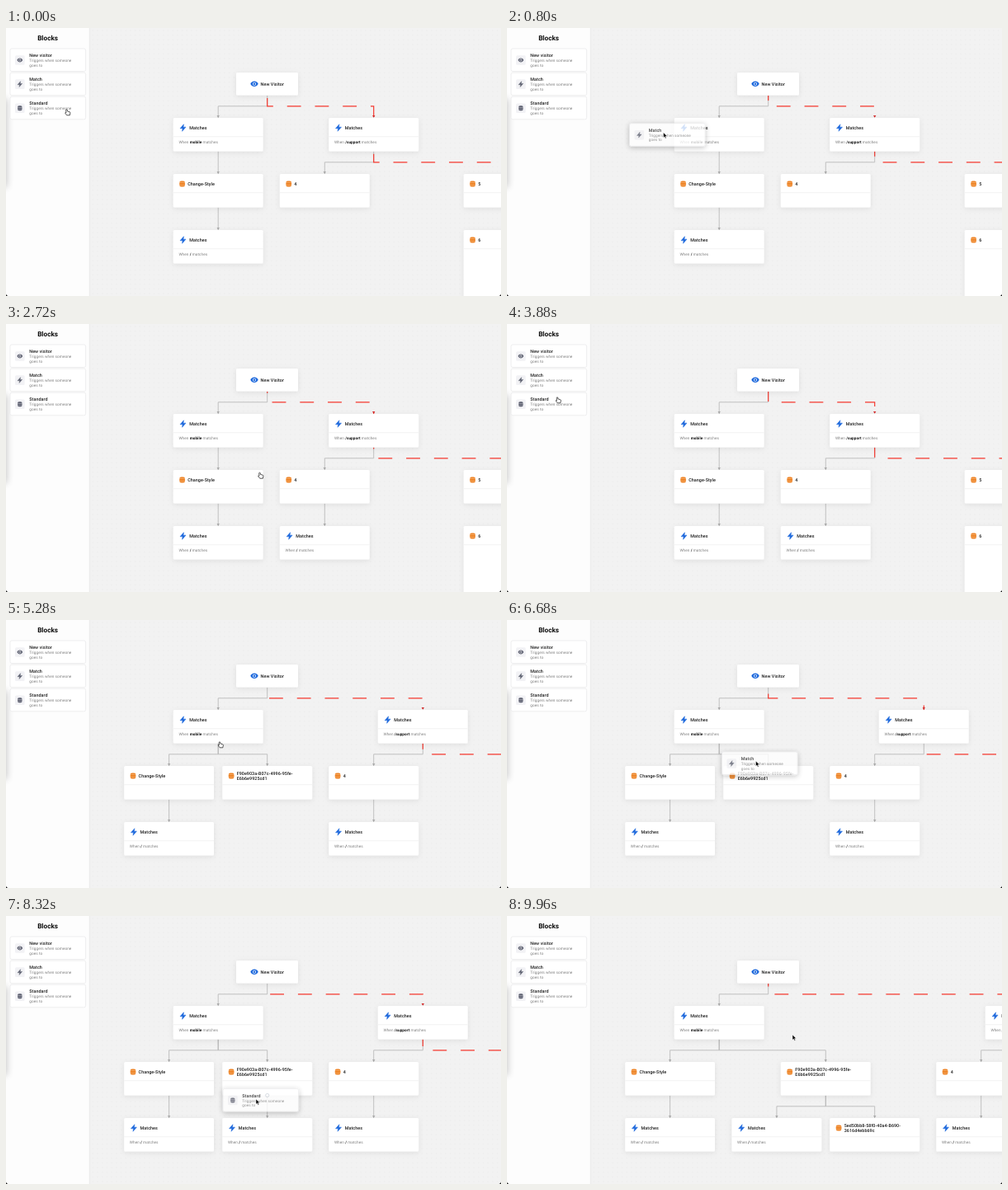
An HTML page that plays this animation: 600 by 325 pixels, repeating every 10 s.

```html
<!DOCTYPE html>
<html lang="en">
<head>
<meta charset="utf-8">
<title>Flow builder</title>
<style>
html, body { margin: 0; width: 100%; height: 100%; overflow: hidden; background: #f2f2f2; }
svg { display: block; width: 600px; height: 325px; font-family: Roboto, Inter, sans-serif; text-rendering: geometricPrecision; }
.title { font-size: 5.4px; font-weight: 500; letter-spacing: .05px; fill: #1c1c1c; }
.note { font-size: 4.7px; letter-spacing: .05px; fill: #7d7d7d; }
.note tspan { font-weight: 700; fill: #151515; }
.wire { fill: none; stroke: #b4b4b4; stroke-width: .8; }
.hot { fill: none; stroke: #f5392f; stroke-width: 1.2; stroke-dasharray: 16.875; }
</style>
</head>
<body>
<svg id="stage" viewBox="0 0 600 325">
  <defs>
    <pattern id="dots" width="5.7" height="5.7" patternUnits="userSpaceOnUse">
      <rect width="5.7" height="5.7" fill="#f2f2f2"/><circle cx="2.8" cy="2.8" r=".5" fill="#e4e4e4"/>
    </pattern>
    <filter id="soft" x="-20%" y="-40%" width="140%" height="190%">
      <feDropShadow dx="0" dy="1.5" stdDeviation="3.2" flood-color="#000" flood-opacity=".08"/>
    </filter>
    <filter id="lift" x="-20%" y="-50%" width="140%" height="210%">
      <feDropShadow dx="0" dy="1.5" stdDeviation="3" flood-color="#000" flood-opacity=".3"/>
    </filter>
    <filter id="blur" x="-200%" y="-20%" width="500%" height="140%"><feGaussianBlur stdDeviation="4.5"/></filter>
    <path id="bolt" d="M1.1-4.9L-4 1H-.5L-1.1 4.9 4-1H.5Z" stroke-width=".6" stroke-linejoin="round"/>
    <g id="eye">
      <path d="M-4.7 0C-2.6-4.4 2.6-4.4 4.7 0C2.6 4.4-2.6 4.4-4.7 0Z"/>
      <circle r="2" fill="#fff"/><circle r="1.3"/>
    </g>
    <g id="stack">
      <path d="M-3.4-1.3Q-3.4-3.6-1.2-3.6H1.2Q3.4-3.6 3.4-1.3Z"/>
      <rect x="-3.4" y="-.9" width="6.8" height="1.8" rx=".5"/>
      <path d="M-3.4 1.3Q-3.4 3.6-1.2 3.6H1.2Q3.4 3.6 3.4 1.3Z"/>
    </g>
  </defs>
  <rect width="600" height="325" fill="url(#dots)"/>
  <g id="trees"></g>
  <rect width="101" height="325" fill="#fdfdfd"/>
  <path d="M101.3 0V325" stroke="#e5e5e5" stroke-width=".7"/>
  <rect x="-12" y="86" width="13" height="107" fill="#000" opacity=".22" filter="url(#blur)"/>
  <text x="50.6" y="15" text-anchor="middle" font-size="8.2" font-weight="700" fill="#0c0c0c">Blocks</text>
  <g id="side"></g>
  <g id="ghosts"></g>
  <circle id="mark" r="2.1" fill="none" stroke="#cdd3db" stroke-width=".8"/>
  <path id="arrow" d="M0 0V6.3L1.5 5 2.5 7.2 3.6 6.7 2.6 4.6H4.6Z" fill="#000" stroke="#fff" stroke-width=".5"/>
  <path id="hand" d="M-1.3 .2Q-.5-.7 .2 .2L.5 2 3.1 2.7Q4 3 3.8 4.1L3.3 6.8H-.3L-2.4 4Q-2.3 3.1-1.1 3.7Z" fill="#fff" stroke="#222" stroke-width=".75" stroke-linejoin="round"/>
  <path d="M0 325V322.5Q.3 324.7 2.5 325ZM600 325V322.5Q599.7 324.7 597.5 325Z" fill="#000"/>
</svg>
<script>
const LOOP = 10000, DASH = 33.75, SPEED = DASH / 504;
const ROWS = [54, 109, 177, 245];
const $ = id => document.getElementById(id);

function icon(name, x, y, color, scale = 1) {
  return `<use href="#${name}" transform="translate(${x} ${y}) scale(${scale})" fill="${color}" stroke="${name === 'bolt' ? color : 'none'}"/>`;
}

function label(cls, x, y, s) {
  return `<text class="${cls}" x="${x}" y="${y}">${s}</text>`;
}

// A node is centred on cx in a row; "when" makes it a match block.
function node({ cx, row, lines, when, tall }) {
  const x = cx - 54.4, y = ROWS[row], h = tall ? 110 : 40.6;
  const tx = x + (when ? 19.4 : 17.4), ty = y + 13.9 - (lines.length - 1) * 3.1;
  return `<rect x="${x}" y="${y}" width="108.8" height="${h}" rx="1.6" fill="#fff" filter="url(#soft)"/>` +
    `<path d="M${x} ${y + 22.7}h108.8" stroke="#ececec" stroke-width=".7"/>` +
    (when ? icon('bolt', x + 11.7, y + 12, '#1d68dc', .87) : icon('stack', x + 10.8, y + 12, '#ee8426')) +
    lines.map((s, i) => label('title', tx, ty + i * 6.3, s)).join('') +
    (when ? label('note', x + 6.6, y + 30.5, `When <tspan>${when}</tspan> matches`) : '');
}

const match = (cx, row, when) => ({ cx, row, lines: ['Matches'], when });
const plain = (cx, row, ...lines) => ({ cx, row, lines });

function route(from, to, row) {
  const a = ROWS[row] + (row ? 40.8 : 28), b = ROWS[row + 1];
  return from === to ? `M${from} ${a}V${b}` : `M${from} ${a}V${b - 14.2}H${to}V${b}`;
}

function tip(x, row, color) {
  const y = ROWS[row + 1] - .3;
  return `<path d="M${x - 1.7} ${y - 2.8}h3.4L${x} ${y}Z" fill="${color}"/>`;
}

// wires and hot edges: [fromX, toX, fromRow]
function tree(nodes, wires, hot) {
  return wires.map(w => `<path class="wire" d="${route(...w)}"/>` + tip(w[1], w[2], '#a9a9a9')).join('') +
    hot.map(w => `<path class="hot" d="${route(...w)}"/>` + tip(w[1], w[2], '#d42c2c')).join('') +
    `<rect x="279" y="54" width="75" height="27.6" rx="1.6" fill="#fff" filter="url(#soft)"/>` +
    icon('eye', 301, 67.8, '#1d68dc') + label('title', 308.6, 69.7, 'New Visitor') +
    nodes.map(node).join('');
}

const UID1 = ['F90e903a-B07c-4996-95fe-', 'E6b6e9925cd1'];
const UID2 = ['5ed50bb8-58f0-40a4-B690-', '3616d4ebb69c'];

// Everything hanging under the two branches, given the column centres.
function layout(style, support, four, five) {
  return {
    nodes: [match(257.2, 1, 'mobile'), match(support, 1, '/support'), plain(style, 2, 'Change-Style'),
      match(style, 3, '/'), plain(four, 2, '4'), plain(five, 2, '5'), { ...plain(five, 3, '6'), tall: true }],
    wires: [[316.7, 257.2, 0], [257.2, style, 1], [style, style, 2], [support, four, 1], [five, five, 2]],
    hot: [[316.7, support, 0], [support, five, 1]]
  };
}

function extend(base, nodes, wires) {
  return { ...base, nodes: [...base.nodes, ...nodes], wires: [...base.wires, ...wires] };
}

const first = layout(257.2, 445.7, 386.3, 609.2);
const second = extend(first, [match(386.3, 3, '/')], [[386.3, 386.3, 2]]);
const third = extend(layout(197.6, 505.3, 445.7, 668.8),
  [match(445.7, 3, '/'), plain(316.7, 2, ...UID1)],
  [[445.7, 445.7, 2], [257.2, 316.7, 1]]);
const fourth = extend(third, [match(316.7, 3, '/')], [[316.7, 316.7, 2]]);
const fifth = extend(layout(197.6, 634.3, 574.7, 798),
  [match(574.7, 3, '/'), plain(386.3, 2, ...UID1), match(326.9, 3, '/'), plain(445.7, 3, ...UID2)],
  [[574.7, 574.7, 2], [257.2, 386.3, 1], [386.3, 326.9, 2], [386.3, 445.7, 2]]);

// at: start time; sync: [time, dash phase]; lag: phase of the second hot edge
const stages = [
  { at: 0, plan: first, sync: [0, 3], lag: 0 },
  { at: 1320, plan: second, sync: [1560, 8.4], lag: 0 },
  { at: 4960, plan: third, sync: [5280, 15], lag: 8.8 },
  { at: 6960, plan: fourth, sync: [8320, 16.2], lag: 8.8 },
  { at: 8480, plan: fifth, sync: [9960, 20.4], lag: 8.8 }
];

const sideTop = i => 25 + i * 29.1;
const blocks = [['New visitor', 'eye', .72], ['Match', 'bolt', .7], ['Standard', 'stack', .82]];

function card(i) {
  const [name, pic, scale] = blocks[i];
  return `<rect width="91.6" height="27.6" rx="2" fill="#fff" stroke="#e7e7e9" stroke-width=".7"/>` +
    `<rect x="6" y="8.2" width="11.6" height="11.6" rx="1.5" fill="#f2f2f5"/>` +
    icon(pic, 11.8, 14, '#5d6070', scale) + label('title', 23.3, 10.1, name) +
    label('note', 23.3, 16.3, 'Triggers when someone') + label('note', 23.3, 21.6, 'goes to');
}

// from, to, block, grab point, drop marker
const drags = [
  { from: 440, to: 1320, block: 1, grab: [41, 11], drop: [386.3, 217.5] },
  { from: 4120, to: 4960, block: 2, grab: [40, 12.5], drop: [257.2, 150] },
  { from: 6040, to: 6960, block: 1, grab: [41, 11], drop: [316.7, 217.5] },
  { from: 7680, to: 8480, block: 2, grab: [40, 12.5], drop: [316.7, 217.5] }
];

// cursor stops: time, x, y
const stops = [
  [0, 74, 99], [360, 46, 65.3], [440, 46, 65.3], [1240, 382, 209], [2300, 382, 209],
  [3640, 66, 87], [3880, 61.5, 89], [4060, 45, 96], [4120, 45, 96], [4900, 259.5, 148], [5320, 259.5, 148],
  [5960, 46, 65.3], [6040, 46, 65.3], [6680, 301.5, 171], [6900, 313, 202], [7080, 313, 202],
  [7600, 45, 96], [7680, 45, 96], [8320, 303, 222], [8440, 318, 208], [8900, 318, 208],
  [9400, 326, 186], [9800, 346, 144], [LOOP, 346, 144]
];

$('trees').innerHTML = stages.map(s => `<g>${tree(s.plan.nodes, s.plan.wires, s.plan.hot)}</g>`).join('');
$('side').innerHTML = blocks.map((b, i) => `<g transform="translate(5 ${sideTop(i)})">${card(i)}</g>`).join('');
$('ghosts').innerHTML = drags.map(d => `<g opacity=".8" filter="url(#lift)">${card(d.block)}</g>`).join('');
const trees = [...$('trees').children], ghosts = [...$('ghosts').children];
const hots = trees.map(g => g.querySelectorAll('.hot'));

const show = (el, on) => el.setAttribute('display', on ? 'inline' : 'none');
const move = (el, x, y) => el.setAttribute('transform', `translate(${x} ${y})`);
const inside = (x, y, l, t, w, h) => x >= l && x <= l + w && y >= t && y <= t + h;

function cursorAt(t) {
  const i = stops.findIndex(s => s[0] > t), a = stops[i - 1], b = stops[i];
  const u = (t - a[0]) / (b[0] - a[0]), e = u * u * (3 - 2 * u);
  return [a[1] + (b[1] - a[1]) * e, a[2] + (b[2] - a[2]) * e];
}

function overCard(x, y, plan) {
  return blocks.some((b, i) => inside(x, y, 5, sideTop(i), 92, 28)) || inside(x, y, 279, 54, 75, 28) ||
    plan.nodes.some(n => inside(x, y, n.cx - 54.4, ROWS[n.row], 108.8, 41));
}

function draw(t) {
  const now = stages.filter(s => s.at <= t).length - 1, stage = stages[now];
  trees.forEach((g, i) => show(g, i === now));
  const phase = stage.sync[1] + (t - stage.sync[0]) * SPEED;
  hots[now].forEach((p, i) => p.setAttribute('stroke-dashoffset', -((phase + i * stage.lag) % DASH)));

  const [x, y] = cursorAt(t);
  const drag = drags.find(d => t >= d.from && t < d.to);
  drags.forEach((d, i) => {
    show(ghosts[i], d === drag);
    if (d === drag) move(ghosts[i], x - d.grab[0], y - d.grab[1]);
  });
  show($('mark'), drag && drag.to - t < 200);
  if (drag) move($('mark'), ...drag.drop);

  const hand = !drag && overCard(x, y, stage.plan);
  show($('hand'), hand);
  show($('arrow'), !hand);
  move($('hand'), x, y);
  move($('arrow'), x, y);
}

const start = performance.now();
function tick() {
  draw((performance.now() - start) % LOOP);
  requestAnimationFrame(tick);
}
tick();
</script>
</body>
</html>
```
